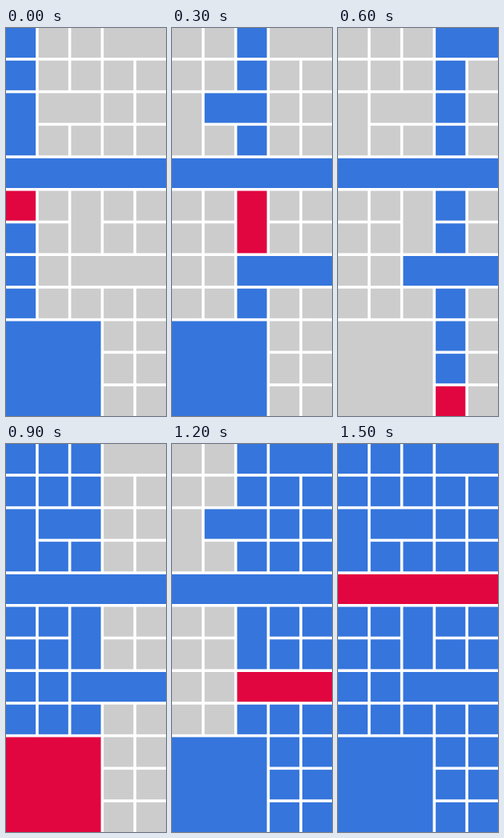
Animation, 200 px wide and 485 px high, one loop 1800 ms. Source, as an HTML page with a canvas:

```html
<!DOCTYPE html>
<html lang="en">
<head>
<meta charset="utf-8">
<title>Overlapping columns</title>
<style>
  html, body { margin: 0; width: 100%; height: 100%; overflow: hidden; background: #fff; }
  canvas { display: block; }
</style>
</head>
<body>
<canvas id="stage" width="200" height="485"></canvas>
<script>
const COLS = 5, ROWS = 12, STEP_MS = 300;
const PITCH = 285 / 7, GAP = COLS * PITCH - 200;
const GREY = '#ccc', BLUE = '#3575dc', RED = '#e10540';
const ctx = document.getElementById('stage').getContext('2d');

// Merged cells as [column, row, width, height]; single cells fill the rest.
const cells = [
  [3, 0, 2, 1], [0, 2, 1, 2], [1, 2, 2, 1], [0, 4, 5, 1],
  [2, 5, 1, 2], [2, 7, 3, 1], [0, 9, 3, 3]
].map(([x, y, w, h]) => ({ x, y, w, h }));

const cellAt = (col, row) => cells.find(({ x, y, w, h }) =>
  col >= x && col < x + w && row >= y && row < y + h);

for (let y = 0; y < ROWS; y++)
  for (let x = 0; x < COLS; x++)
    if (!cellAt(x, y)) cells.push({ x, y, w: 1, h: 1 });

const picks = [[0, 5], [2, 5], [3, 11], [0, 9], [2, 7], [0, 4]]
  .map(([col, row]) => cellAt(col, row));

const sharesColumn = (a, b) => a.x < b.x + b.w && b.x < a.x + a.w;

function draw(time) {
  const picked = picks[Math.floor(time / STEP_MS) % picks.length];
  ctx.clearRect(0, 0, 200, 485);
  for (const cell of cells) {
    ctx.fillStyle = cell === picked ? RED : sharesColumn(cell, picked) ? BLUE : GREY;
    ctx.fillRect(cell.x * PITCH, cell.y * PITCH, cell.w * PITCH - GAP, cell.h * PITCH - GAP);
  }
}

const start = performance.now();
function tick() {
  draw(performance.now() - start);
  requestAnimationFrame(tick);
}
tick();
</script>
</body>
</html>
```
